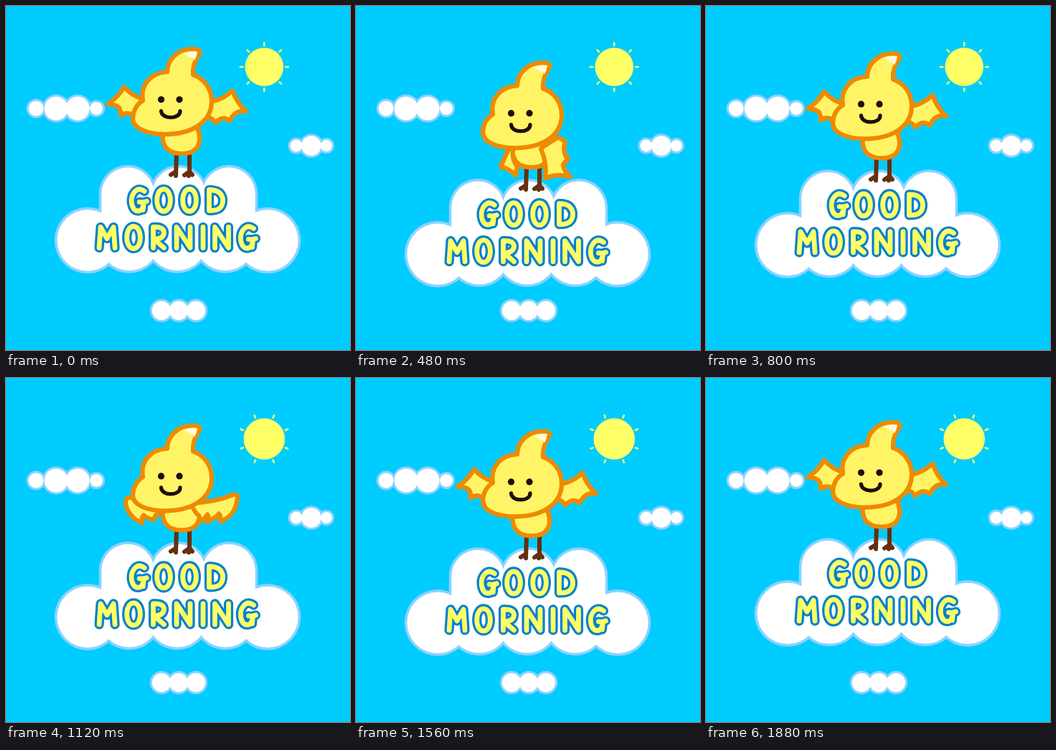
An HTML page with a canvas that plays this animation: 480x480 px, repeating every 1920 ms.

```html
<!DOCTYPE html>
<html lang="en">
<head>
<meta charset="utf-8">
<title>Good morning</title>
<style>
html, body { margin: 0; width: 100%; height: 100%; overflow: hidden; background: #00ccff; }
canvas { display: block; width: 480px; height: 480px; }
</style>
</head>
<body>
<canvas id="stage" width="480" height="480" role="img" aria-label="GOOD MORNING"></canvas>
<script>
const ctx = document.getElementById('stage').getContext('2d');
const LOOP = 1920, STEP = 40, BOB = 960, SUN_HOLD = 200;
const SKY = '#00ccff', RIM = '#8cd2ff', SUN = '#ffff66', INK = '#0080d0';
const SKIN = '#fff466', EDGE = '#ee8a00', LEG = '#633010', DARK = '#1c0d0a';

const smallClouds = [
  [[42, 143, 12], [70, 143, 18], [100, 143, 18], [126, 143, 10.5]],
  [[405, 195, 10], [426, 195, 15.3], [447, 195, 9.5]],
  [[217, 425, 14.7], [241, 425, 14.7], [265, 425, 14.7]]
];
const bigCloud = [
  [170, 262, 38.5], [241, 262, 38.5], [311, 262, 38.5],
  [114, 327, 44.5], [172, 327, 44], [239, 327, 44], [306, 327, 44], [365, 327, 44.5]
];

const head = new Path2D(`M225 92 C225 75 240 59 262 60 C270 60 272 64 269 68
  C263 77 260 85 261 96 C276 101 287 115 287 133 C287 160 262 179 222 179
  C195 179 177 170 177 157 C177 147 182 137 191 132 C187 110 202 93 225 92Z`);
const shine = new Path2D('M248 67Q256 62 267 64Q266 71 263 76Q261 70 257 72Q254 68 248 67Z');
const body = new Path2D('M220 172C215 193 224 206 245 206C267 206 275 192 267 170Z');
const legs = new Path2D(`M238 205L237 237M237 231L230 235.5
  M256 205L256 231L249 236M256 231L255 237M256 231L260 235.5`);
const mouth = new Path2D('M216.5 146.5C217 158.5 243 158.5 243 146.5');

const wings = {
  up: [
    'M192 130Q176 126 165 113Q156 128 142 137Q153 137 158 142Q161 148 160 153Q168 147 177 152L190 152Z',
    'M280 134Q300 133 316 118Q323 137 335 147Q320 144 312 160Q302 152 292 163Q288 156 278 153Z'
  ],
  mid: [
    'M182 160L169 161Q165 166 169 176Q175 190 190 196Q188 189 192 185Q198 191 208 191Q206 187 210 184L225 178Z',
    'M256 168Q290 168 318 156Q325 155 322 166Q319 186 299 194Q301 187 297 183Q291 191 280 194Q284 188 281 184Q277 191 270 194Q272 186 266 183Z'
  ],
  down: [
    'M213 180L202 205Q213 207 223 217L225 205Q217 195 219 180Z',
    'M260 178L282 164L292 170Q287 184 296 195Q287 200 290 207Q293 214 299 219Q280 214 264 221Q267 200 258 180Z'
  ]
};
for (const k in wings) wings[k] = wings[k].map(d => new Path2D(d));

// Letter strokes, 30 units tall
const glyphs = {
  G: 'M18 3Q10 -3 4 4Q-1 10 0 19Q2 31 10 30.5Q16 30 17 18M11 18Q17 19 21 17M17 18L16 29',
  O: 'M9 0C21.5 0 21.5 31 9 31C-3.5 31 -3.5 0 9 0Z',
  D: 'M1 1L1 30Q21 31 20 14Q18 1 1 1Z',
  M: 'M0 30L2 1L11 17L20 1L22 30',
  R: 'M0 30L0 1Q15 0 15 9Q14 18 1 18L15 30',
  N: 'M0 30L0 1L19 30L19 1',
  I: 'M0 1L0 30'
};
const text = new Path2D();
function addWord(word, xs, y) {
  [...word].forEach((c, i) =>
    text.addPath(new Path2D(glyphs[c]), new DOMMatrix([1, 0, 0, 1, xs[i], y])));
}
addWord('GOOD', [175.2, 211, 247, 282.5], 255.5);
addWord('MORNING', [130, 169, 205.5, 238, 275, 291.5, 327.5], 307.5);

function line(path, width, color) {
  ctx.lineWidth = width;
  ctx.strokeStyle = color;
  ctx.stroke(path);
}

function shape(path, fill) {
  ctx.fillStyle = fill;
  ctx.fill(path);
  line(path, 6.2, EDGE);
}

function disc(x, y, r, color) {
  ctx.fillStyle = color;
  ctx.beginPath();
  ctx.arc(x, y, r, 0, Math.PI * 2);
  ctx.fill();
}

// All lobes in the rim colour, then smaller ones in white; the block joins the two rows
function cloud(lobes, rim, block) {
  for (const [grow, color] of [[rim / 2, RIM], [-rim / 2, '#fff']]) {
    for (const [x, y, r] of lobes) disc(x, y, r + grow, color);
    if (block) {
      const [left, top, right, bottom] = block;
      ctx.fillRect(left - grow, top, right - left + 2 * grow, bottom - top);
    }
  }
}

function sun(turned) {
  const grow = turned ? 2 : 0;
  disc(360.3, 85, 26.8 + grow, SUN);
  const rays = new Path2D();
  for (let i = 0; i < 8; i++) {
    const a = (i + (turned ? 0.5 : 0)) * Math.PI / 4;
    const c = Math.cos(a), s = Math.sin(a);
    rays.moveTo(360.3 + c * (30 + grow), 85 + s * (30 + grow));
    rays.lineTo(360.3 + c * (33.5 + grow), 85 + s * (33.5 + grow));
  }
  line(rays, 2.5, SUN);
}

function wingPose(t) {
  const p = t % BOB;
  if (p < 120 || p >= 600) return wings.up;
  return p >= 240 && p < 520 ? wings.down : wings.mid;
}

function bird(t) {
  line(legs, 6, LEG);
  shape(body, SKIN);
  for (const w of wingPose(t)) shape(w, SKIN);
  shape(head, SKIN);
  ctx.fillStyle = '#fffbe0';
  ctx.fill(shine);
  disc(216.5, 130.5, 4.6, DARK);
  disc(242, 130.5, 4.6, DARK);
  line(mouth, 5.2, DARK);
}

function draw(t) {
  ctx.fillStyle = SKY;
  ctx.fillRect(0, 0, 480, 480);
  ctx.lineCap = ctx.lineJoin = 'round';
  smallClouds.forEach(c => cloud(c, 3));
  sun(Math.floor(t / SUN_HOLD) % 2 === 1);

  const p = t % BOB;
  ctx.save();
  ctx.translate(0, Math.min(p, BOB - p) * 0.04);
  cloud(bigCloud, 3.5, [131.5, 262, 349.5, 337]);
  line(text, 13.2, INK);
  line(text, 6.8, SUN);
  bird(t);
  ctx.restore();
}

const start = performance.now();
function tick() {
  const t = (performance.now() - start) % LOOP;
  draw(Math.floor(t / STEP) * STEP);
  requestAnimationFrame(tick);
}
draw(0);
requestAnimationFrame(tick);
</script>
</body>
</html>
```
